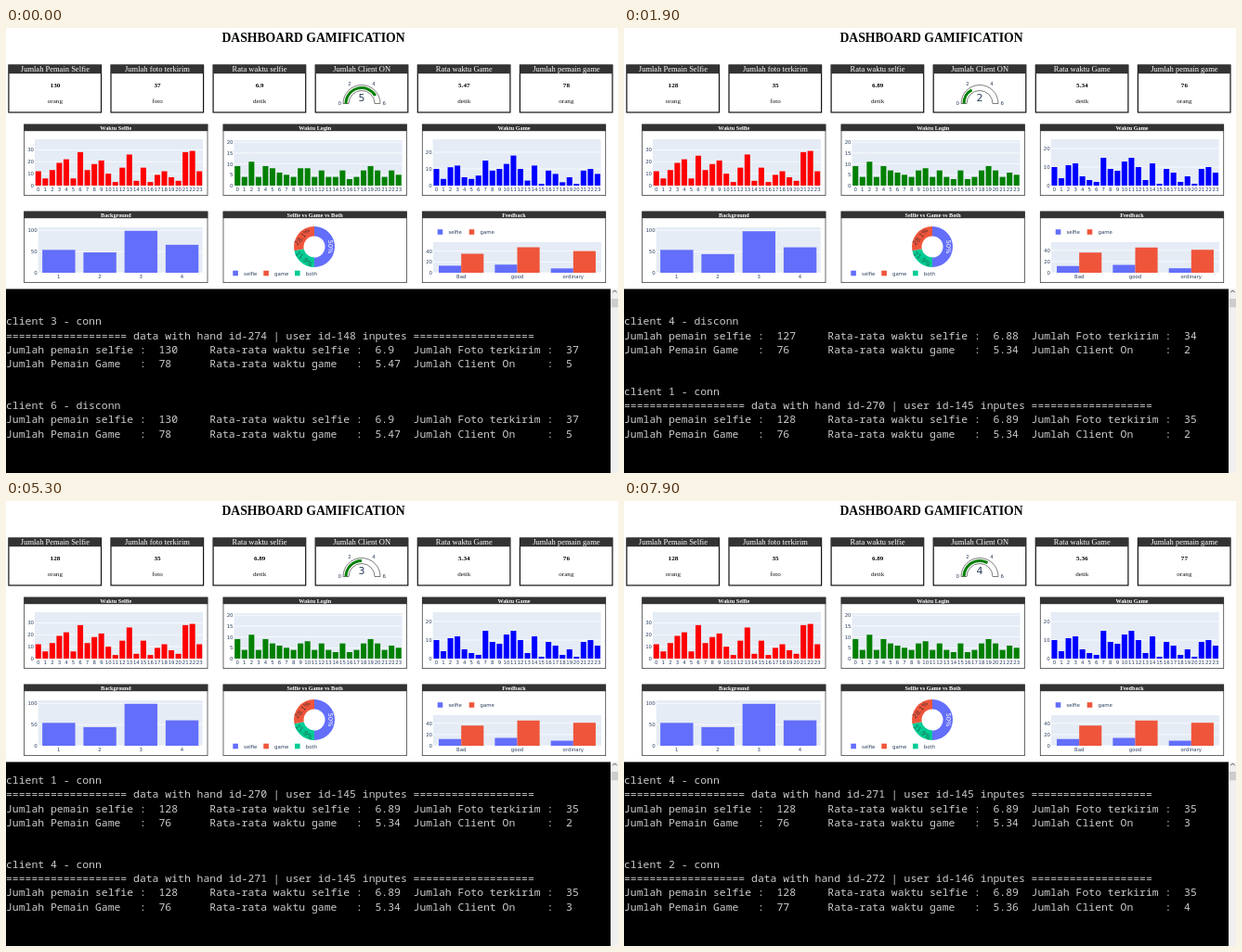
Animation of 659 by 480 pixels, one loop 8000 ms. Source, as an HTML page:

```html
<!DOCTYPE html>
<html lang="id">
<head>
<meta charset="utf-8">
<title>Dashboard Gamification</title>
<style>
html, body { margin: 0; width: 100%; height: 100%; overflow: hidden; background: #fff; }
svg { display: block; width: 659px; height: 480px; }
.serif { font-family: "Liberation Serif", "Times New Roman", serif; }
.sans { font-family: "DejaVu Sans", Verdana, sans-serif; }
.mono { font-family: "Noto Sans Mono", Consolas, monospace; white-space: pre; }
</style>
</head>
<body>
<svg id="stage" viewBox="0 0 659 480"></svg>
<script>
const stage = document.getElementById('stage');
const LOOP = 8000, ROWS = 12;
const BLUE = '#636efa', RED = '#ef553b', GREEN = '#00cc96', INK = '#2a3f5f', DARK = '#333';

// Drawing helpers
const rect = (x, y, w, h, fill, extra = '') =>
  `<rect x="${x}" y="${y}" width="${w}" height="${h}" fill="${fill}" ${extra}/>`;
const label = (x, y, str, size, { font = 'sans', fill = INK, anchor = 'middle', bold = false, extra = '' } = {}) =>
  `<text class="${font}" x="${x}" y="${y}" font-size="${size}" fill="${fill}" text-anchor="${anchor}"` +
  `${bold ? ' font-weight="700"' : ''} ${extra}>${str.toString().replace(/>/g, '&gt;')}</text>`;
const polar = (cx, cy, r, deg) => {
  const a = deg * Math.PI / 180;
  return `${(cx + r * Math.cos(a)).toFixed(2)} ${(cy + r * Math.sin(a)).toFixed(2)}`;
};
const ring = (cx, cy, r0, r1, from, to, attrs) => {
  const big = to - from > 180 ? 1 : 0;
  return `<path d="M${polar(cx, cy, r1, from)}A${r1} ${r1} 0 ${big} 1 ${polar(cx, cy, r1, to)}` +
    `L${polar(cx, cy, r0, to)}A${r0} ${r0} 0 ${big} 0 ${polar(cx, cy, r0, from)}Z" ${attrs}/>`;
};

// Terminal text
const stats = (selfie, avgSelfie, photos, game, avgGame, on) => [
  'Jumlah pemain selfie :  ' + String(selfie).padEnd(8) +
    'Rata-rata waktu selfie :  ' + avgSelfie.padEnd(6) + 'Jumlah Foto terkirim :  ' + photos,
  'Jumlah Pemain Game   :  ' + String(game).padEnd(8) +
    'Rata-rata waktu game   :  ' + avgGame.padEnd(6) + 'Jumlah Client On     :  ' + on,
  '', ''];
const inputs = (hand, user) => {
  const rule = '='.repeat(19);
  return `${rule} data with hand id-${hand} | user id-${user} inputes ${rule}`;
};
const before = stats(127, '6.88', 34, 76, '5.34', 2);
const session = [
  '(ojtaa4) C:\\OJT\\ojt\\database\\postgresql>python random_data.py',
  'client 5 - disconn', ...before,
  'client 4 - disconn', ...before,
  'client 1 - conn', inputs(270, 145), ...stats(128, '6.89', 35, 76, '5.34', 2),
  'client 4 - conn', inputs(271, 145), ...stats(128, '6.89', 35, 76, '5.34', 3),
  'client 2 - conn', inputs(272, 146), ...stats(128, '6.89', 35, 77, '5.36', 4)
];
const latest = stats(130, '6.9', 37, 78, '5.47', 5);
const lateLog = ['', 'client 3 - conn', inputs(274, 148), ...latest, 'client 6 - disconn', ...latest];

// Dashboard data
const selfieBars = [12, 6, 13, 19, 22, 6, 28, 13, 18, 21, 10, 3, 15, 26, 4, 15, 3, 9, 12, 7, 4, 28, 29, 12];
const loginBars = [9, 4, 11, 4, 9, 7, 6, 5, 4, 7, 8, 4, 7, 4, 3, 7, 3, 4, 7, 9, 7, 4, 6, 5];
const gameBars = [10, 4, 11, 12, 5, 3, 2, 15, 9, 8, 13, 15, 10, 3, 12, 1, 9, 7, 2, 5, 1, 9, 10, 7];
const swap = (list, changes) => Object.assign([...list], changes);

// Each step overrides part of the state that came before it
const steps = [
  [0, {
    cards: [130, 37, '6.9', '5.47', 78], on: 5, log: lateLog, lines: 12,
    selfie: selfieBars,
    login: swap(loginBars, { 5: 8, 6: 6, 9: 8, 14: 4, 22: 7 }),
    game: swap(gameBars, { 5: 4, 6: 6, 9: 10, 11: 18 }), gameUnit: 1.8,
    rooms: [54, 48, 99, 66], mood: [[13, 15, 8], [35, 47, 40]], moodUnit: .585
  }],
  [100, {
    cards: [127, 34, '6.88', '5.34', 76], on: 2, log: session, lines: 11,
    selfie: swap(selfieBars, { 6: 25 }), login: loginBars, game: gameBars, gameUnit: 2,
    rooms: [54, 44, 98, 60], mood: [[12, 14, 8], [36, 45, 41]], moodUnit: .605
  }],
  [700, { lines: 12 }],
  [1100, { lines: 17 }],
  [1600, { cards: [128, 35, '6.89', '5.34', 76] }],
  [2200, { selfie: selfieBars }],
  [2800, { rooms: [54, 44, 99, 60], mood: [[12, 14, 9], [36, 45, 41]] }],
  [3900, { lines: 18 }],
  [4100, { lines: 23 }],
  [4300, { on: 3 }],
  [7100, { lines: 24 }],
  [7300, { lines: 29 }],
  [7500, { cards: [128, 35, '6.89', '5.36', 77], on: 4 }]
];
const states = [];
for (const [, change] of steps) states.push({ ...states[states.length - 1], ...change });

// Dashboard parts
function card(i, title, value, unit) {
  const x = 2.9 + i * 110.1, mid = x + 50;
  let out = rect(x, 40, 99.6, 51, '#fff', 'stroke="#111" stroke-width="1.2"') +
    rect(x, 39.8, 99.6, 9.4, DARK) +
    label(mid, 47, title, 8.5, { font: 'serif', fill: '#fff' });
  if (unit) {
    out += label(mid, 64.3, value, 7.1, { font: 'serif', fill: '#000', bold: true }) +
      label(mid, 81.4, unit, 7.1, { font: 'serif', fill: '#111' });
  }
  return out;
}

function gauge(value) {
  const cx = 383, cy = 81.5;
  return ring(cx, cy, 14, 20, 180, 360, 'fill="#fff" stroke="#444" stroke-width=".7"') +
    ring(cx, cy, 15.5, 18.5, 180, 180 + value * 30, 'fill="green"') +
    label(359.3, 83.2, 0, 5.4) + label(370, 61.5, 2, 5.4) +
    label(396, 61.5, 4, 5.4) + label(407.3, 83.2, 6, 5.4) +
    label(cx, 79.3, value, 11);
}

const panel = (x, y, title) =>
  rect(x + .3, y, 197.4, 76.6, '#fff', 'stroke="#444" stroke-width=".8"') +
  rect(x, y - .2, 198, 7.4, DARK) +
  label(x + 99, y + 5.5, title, 6.2, { font: 'serif', fill: '#fff', bold: true });

// series: list of [values, colour] drawn side by side in each category
function bars({ x, top, base, width, unit, ticks, names, series }) {
  const slot = width / names.length, w = slot * .8 / series.length;
  let out = rect(x, top, width, base - top, '#e5ecf6');
  for (const t of ticks) {
    const y = base - t * unit;
    out += rect(x, y - .35, width, .7, '#fff') + label(x - 1, y + 2, t, 5.4, { anchor: 'end' });
  }
  names.forEach((name, i) => {
    const left = x + (i + .1) * slot;
    series.forEach(([values, fill], k) => {
      out += rect((left + k * w).toFixed(2), base - values[i] * unit, w.toFixed(2), values[i] * unit, fill);
    });
    out += label((x + (i + .5) * slot).toFixed(2), base + 5.8, name, 5.4);
  });
  return out;
}

const legend = (x, y, fill, name) =>
  rect(x, y - 2.8, 5.6, 5.6, fill) + label(x + 11.8, y + 2, name, 5.4, { anchor: 'start' });

function donut() {
  const cx = 332, cy = 236;
  const slices = [[-90, 90, BLUE, '50%', '#fff', 90], [90, 169, GREEN, '21.9%', '#264', 40], [169, 270, RED, '28.1%', '#533', -50]];
  return slices.map(([from, to, fill, text, ink, turn]) => {
    const [tx, ty] = polar(cx, cy, 17, (from + to) / 2).split(' ');
    return ring(cx, cy, 11.5, 22, from, to, `fill="${fill}"`) +
      label(0, 2.5, text, 6.8, { fill: ink, extra: `transform="translate(${tx} ${ty}) rotate(${turn})"` });
  }).join('');
}

function terminal(log, lines) {
  const first = Math.max(0, lines - ROWS);
  let out = rect(0, 281.5, 651, 198.5, '#000') + rect(651, 281.5, 8, 198.5, '#f0f0f0') +
    rect(651.6, 292, 7.4, 9.3, '#cdcdcd') +
    '<path d="M653.3 285.3l2.2-2.4l2.2 2.4" fill="none" stroke="#555" stroke-width="1"/>';
  log.slice(first, lines).forEach((str, row) => {
    if (str) out += label(0, (305.2 + row * 15.16).toFixed(2), str, 11.43, { font: 'mono', fill: '#ccc', anchor: 'start' });
  });
  return out;
}

const hours = [...Array(24).keys()];
const hourly = (x, top, unit, ticks, values, fill) =>
  bars({ x, top, base: 170, width: 181, unit, ticks, names: hours, series: [[values, fill]] });

function draw(s) {
  const [players, photos, avgSelfie, avgGame, gamers] = s.cards;
  stage.innerHTML = rect(0, 0, 659, 480, '#fff') +
    label(331, 15, 'DASHBOARD GAMIFICATION', 13.7, { font: 'serif', fill: '#000', bold: true }) +
    card(0, 'Jumlah Pemain Selfie', players, 'orang') +
    card(1, 'Jumlah foto terkirim', photos, 'foto') +
    card(2, 'Rata waktu selfie', avgSelfie, 'detik') +
    card(3, 'Jumlah Client ON') + gauge(s.on) +
    card(4, 'Rata waktu Game', avgGame, 'detik') +
    card(5, 'Jumlah pemain game', gamers, 'orang') +
    panel(19.3, 104, 'Waktu Selfie') +
    hourly(31, 120, 1.29, [0, 10, 20, 30], s.selfie, 'red') +
    panel(233.7, 104, 'Waktu Login') +
    hourly(245.5, 121, 2.34, [0, 5, 10, 15, 20], s.login, 'green') +
    panel(448, 104, 'Waktu Game') +
    hourly(459.7, 120, s.gameUnit, [0, 10, 20], s.game, 'blue') +
    panel(19.3, 198, 'Background') +
    bars({ x: 34.7, top: 215, base: 264, width: 177, unit: .457, ticks: [0, 50, 100],
      names: [1, 2, 3, 4], series: [[s.rooms, BLUE]] }) +
    panel(233.7, 198, 'Selfie vs Game vs Both') + donut() +
    legend(244.3, 264.5, BLUE, 'selfie') + legend(277.3, 264.5, RED, 'game') + legend(311, 264.5, GREEN, 'both') +
    panel(448, 198, 'Feedback') +
    legend(464.7, 220, BLUE, 'selfie') + legend(498.7, 220, RED, 'game') +
    bars({ x: 460, top: 231, base: 264, width: 181, unit: s.moodUnit, ticks: [0, 20, 40],
      names: ['Bad', 'good', 'ordinary'], series: [[s.mood[0], BLUE], [s.mood[1], RED]] }) +
    terminal(s.log, s.lines);
}

let shown = -1;
const began = performance.now();
function tick() {
  const t = (performance.now() - began) % LOOP;
  let now = steps.length - 1;
  while (steps[now][0] > t) now--;
  if (now !== shown) draw(states[shown = now]);
  requestAnimationFrame(tick);
}
tick();
</script>
</body>
</html>
```
